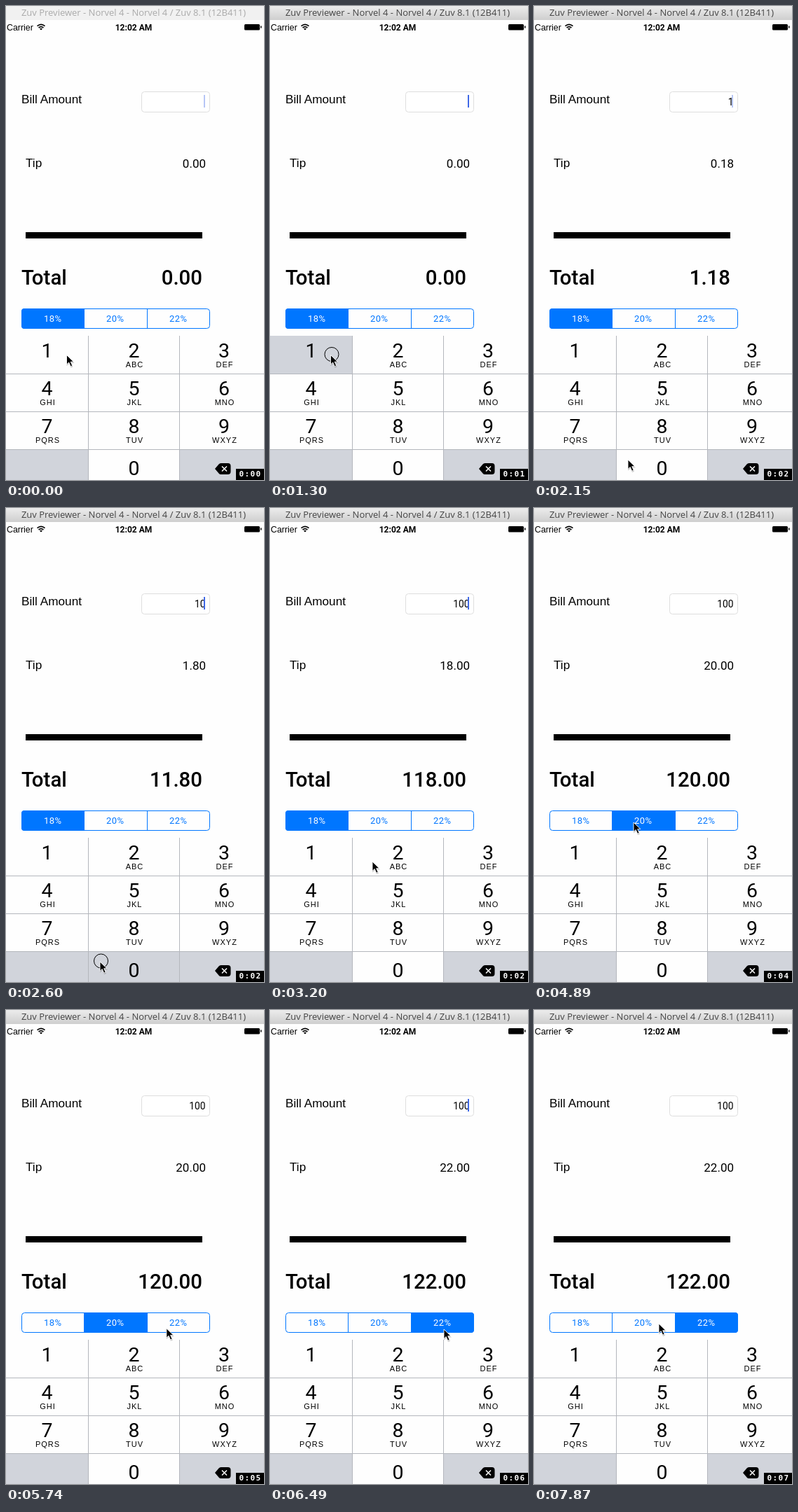
These frames come from a looping animation (368x677 px, 8 s). An HTML page:

```html
<!DOCTYPE html>
<html lang="en">
<head>
<meta charset="utf-8">
<title>Tip calculator</title>
<style>
  html, body { margin: 0; width: 100%; height: 100%; overflow: hidden; background: #fefefe; }
  svg { display: block; width: 368px; height: 677px; }
  text { font-family: "Liberation Sans", Arial, sans-serif; }
  .num { font-family: Roboto, "Liberation Sans", sans-serif; }
  .mid { text-anchor: middle; }
  .end { text-anchor: end; }
  .big { font-size: 29.4px; font-weight: 500; }
  .label { font-size: 17.2px; }
  .digit { font-size: 28.5px; }
  .letters { font-size: 11px; letter-spacing: 1px; }
  .segment { font-size: 13px; letter-spacing: .4px; }
  #title { font: 13px "Open Sans", "Noto Sans", sans-serif; }
  #clock { font: bold 11px "DejaVu Sans Mono", monospace; letter-spacing: 1.4px; }
</style>
</head>
<body>
<svg viewBox="0 0 368 677">
  <defs>
    <linearGradient id="chrome" x2="0" y2="1">
      <stop stop-color="#ececec"/><stop offset="1" stop-color="#cecece"/>
    </linearGradient>
    <clipPath id="pill"><rect x="22" y="432" width="269" height="29" rx="4"/></clipPath>
  </defs>
  <rect width="368" height="677" fill="#fefefe"/>

  <rect id="bar" width="368" height="20"/>
  <text id="title" class="mid" x="182" y="14">Zuv Previewer - Norvel 4 - Norvel 4 / Zuv 8.1 (12B411)</text>

  <text x="1" y="34.5" font-size="12.4">Carrier</text>
  <g fill="none" stroke="#000" stroke-width="1.7">
    <path d="M44.5 28.6q5.5-4.6 11 0M46.6 31q3.4-2.8 6.8 0"/>
    <path d="M48 32.5q2-1.5 4 0l-2 2z" fill="#000" stroke="none"/>
  </g>
  <text class="num mid" x="182" y="34.5" font-size="12" font-weight="600">12:02 AM</text>
  <rect x="340" y="26" width="22" height="8.5" rx="1.5"/>
  <rect x="363" y="28.5" width="1.5" height="3"/>

  <text class="label" x="22" y="138.5">Bill Amount</text>
  <rect x="193.5" y="122.5" width="97" height="29" rx="4" fill="#fff" stroke="#dedede"/>
  <text id="bill" class="num end" x="284.5" y="141.5" font-size="13.8"></text>
  <rect id="caret" x="282" y="127" width="2" height="18" fill="#4069e6"/>

  <text class="label" x="28" y="230">Tip</text>
  <text id="tip" class="num end" x="285" y="230.5" font-size="17"></text>
  <rect x="28" y="323" width="252" height="9"/>
  <text class="num big" x="22" y="398">Total</text>
  <text id="total" class="num big end" x="280" y="398"></text>

  <g id="segments" clip-path="url(#pill)"></g>
  <rect x="22.5" y="432.5" width="268" height="28" rx="4" fill="none" stroke="#0076ff"/>
  <g id="keys"></g>
  <path d="M298 661l5.5-6.5q1.2-1.5 3-1.5h10q4 0 4 4v8q0 4-4 4h-10q-1.8 0-3-1.5z"/>
  <path d="M308 657.5l7 7m0-7l-7 7" stroke="#fff" stroke-width="1.5"/>

  <g id="pointer">
    <circle id="ring" cx="1.5" cy="-1" r="10" fill="none" stroke="#000"/>
    <path d="M0 1.5v14l3.5-3 2.5 5.5 3-1-2.5-5.5h4.5z" opacity=".2"/>
    <path d="M0 0v13.5l3.2-3 2.5 5.7 2.5-1-2.5-5.5h4.3z" stroke="#fff" stroke-width=".9"/>
  </g>

  <rect x="328" y="661" width="40" height="16"/>
  <text id="clock" x="332.5" y="672" fill="#fff"></text>
</svg>

<script>
const LOOP = 8000, PRESS = 150, SECOND = 1075, BLINK = 1070;
const BLUE = '#0076ff', WHITE = '#fefefe', GRAY = '#d1d4db';
const $ = id => document.getElementById(id);
const set = (id, name, value) => $(id).setAttribute(name, value);

const rates = [18, 20, 22];
$('segments').innerHTML = rates.map((rate, i) => {
  const x = 22 + Math.floor(89.7 * i);
  return `<rect id="seg${i}" x="${x}" y="432" width="90" height="29"/>
    ${i ? `<path d="M${x + .5} 432v29" stroke="${BLUE}"/>` : ''}
    <text id="rate${i}" class="num mid segment" x="${x + 44.7}" y="451">${rate}%</text>`;
}).join('');

// The keypad is 375 wide and runs off the right edge of the stage.
const letters = ['', 'ABC', 'DEF', 'GHI', 'JKL', 'MNO', 'PQRS', 'TUV', 'WXYZ'];
$('keys').innerHTML = `<rect y="471" width="368" height="206" fill="${GRAY}"/>` +
  [...'123456789 0'].map((digit, i) => {
    if (digit === ' ') return '';
    const column = i % 3, y = 471 + 54 * Math.floor(i / 3);
    const left = Math.max(0, 130 * column - 12), right = Math.min(375, 130 * column + 118);
    const center = (left + right) / 2;
    return `<rect id="key${digit}" x="${left}" y="${y}" width="${right - left}" height="54" fill="${WHITE}"/>
      <text class="num mid digit" x="${center - .5}" y="${y + (digit === '0' ? 36.5 : 30.5)}">${digit}</text>
      <text class="mid letters" x="${center + .5}" y="${y + 45}">${letters[i] || ''}</text>`;
  }).join('') +
  '<path d="M0 525.5h368m-368 54h368m-368 54h368M117.5 471v206m130-206v206" stroke="#b4b7bd"/>';

const taps = [
  { at: 1000, on: 'window' }, { at: 1300, on: 'key1' }, { at: 2300, on: 'key0' },
  { at: 2600, on: 'key0' }, { at: 4600, on: 'seg1' }, { at: 6040, on: 'seg2' }
];
const home = { x: 86.5, y: 498.5 };
const moves = [
  { from: 1600, to: 2150, x: 134, y: 648 },
  { from: 2900, to: 3200, x: 146, y: 505 },
  { from: 3200, to: 3900, x: 102, y: 445 },
  { from: 4200, to: 4600, x: 142, y: 449 },
  { from: 5340, to: 5890, x: 248, y: 456 },
  { from: 7280, to: 7870, x: 178, y: 448 }
];

const clamp = v => Math.max(0, Math.min(1, v));
const ease = v => v * v * (3 - 2 * v);

function pointerAt(t) {
  return moves.reduce((p, move) => {
    const k = ease(clamp((t - move.from) / (move.to - move.from)));
    return { x: p.x + (move.x - p.x) * k, y: p.y + (move.y - p.y) * k };
  }, home);
}

// The caret stays lit for a moment after typing, then pulses.
function caretAt(t) {
  const typed = taps.findLast(tap => tap.at <= t && !tap.on.startsWith('seg'));
  const age = Math.max(0, t - (typed ? typed.at : -850) - 560);
  return clamp(.6 + 1.6 * Math.cos(2 * Math.PI * age / BLINK));
}

function draw(t) {
  const done = taps.filter(tap => tap.at + PRESS <= t).map(tap => tap.on);
  const press = taps.find(tap => tap.at <= t && t < tap.at + PRESS);
  const pressed = press && press.on;
  const bill = done.filter(on => on.startsWith('key')).map(on => on.at(-1)).join('');
  const choice = done.filter(on => on.startsWith('seg')).length;
  const tip = bill * rates[choice] / 100;
  const active = t >= taps[0].at;

  set('bar', 'fill', active ? 'url(#chrome)' : '#f1f1f1');
  set('title', 'fill', active ? '#444' : '#aaa');
  $('bill').textContent = bill;
  $('tip').textContent = tip.toFixed(2);
  $('total').textContent = (+bill + tip).toFixed(2);
  $('clock').textContent = '0:0' + Math.floor((t + 15) / SECOND);
  set('caret', 'opacity', caretAt(t));

  rates.forEach((_, i) => {
    const chosen = i === choice;
    set('seg' + i, 'fill', chosen ? BLUE : pressed === 'seg' + i ? '#d5e8ff' : WHITE);
    set('rate' + i, 'fill', chosen ? WHITE : BLUE);
  });
  for (const key of ['key0', 'key1']) set(key, 'fill', pressed === key ? GRAY : WHITE);

  const { x, y } = pointerAt(t);
  set('pointer', 'transform', `translate(${x} ${y})`);
  set('ring', 'visibility', press ? 'visible' : 'hidden');
}

const begin = performance.now();
function tick() {
  draw((performance.now() - begin) % LOOP);
  requestAnimationFrame(tick);
}
tick();
</script>
</body>
</html>
```
